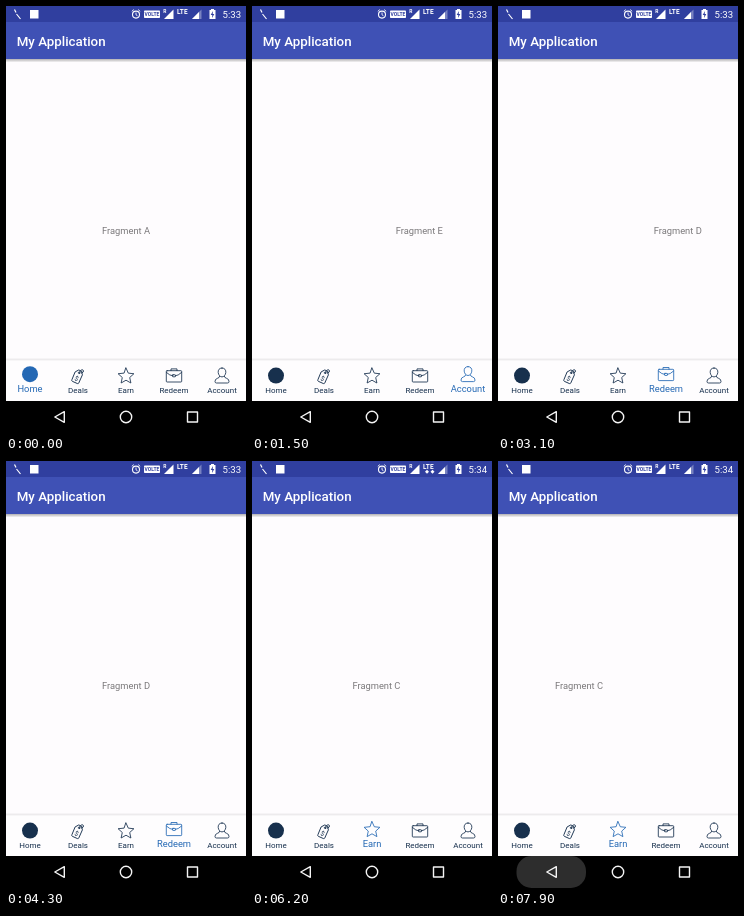
An HTML page for the animation above (8 s loop, 240x427 px).

```html
<!DOCTYPE html>
<html lang="en">
<head>
<meta charset="utf-8">
<title>Bottom navigation</title>
<style>
  html, body { margin: 0; width: 100%; height: 100%; overflow: hidden; background: #fefcfe; }
  svg { display: block; width: 100vw; height: 100vh; }
  text { font-family: Roboto, sans-serif; }
  .page { font-size: 9.33px; fill: #7a787a; text-anchor: middle; }
  .tab { color: #17304d; }
  .tab text { font-size: 8px; fill: currentColor; text-anchor: middle; }
  .tab .icon { fill: none; stroke: currentColor; stroke-width: .85; stroke-linejoin: round; stroke-linecap: round; }
  .tab .dot { fill: currentColor; stroke: none; }
  .tab.on { color: #2468b4; }
  .tab.on .icon { transform: translateY(-1.4px); }
  .tab.on .label { font-size: 9.33px; transform: translateY(-.9px); }
  .tab .icon text { font-size: 6.5px; stroke: none; }
  #press { fill: #2d2d2d; animation: press 8s step-end infinite; }
  @keyframes press {
    0% { opacity: 0; }
    95% { opacity: .35; }
    96.25% { opacity: .7; }
    97.5% { opacity: 1; }
  }
</style>
</head>
<body>
<svg viewBox="0 0 240 427" preserveAspectRatio="none">
  <defs>
    <linearGradient id="shade" x2="0" y2="1">
      <stop offset="0" stop-color="#000" stop-opacity=".3"/>
      <stop offset="1" stop-color="#000" stop-opacity="0"/>
    </linearGradient>
    <linearGradient id="lift" x2="0" y2="1">
      <stop offset="0" stop-color="#000" stop-opacity="0"/>
      <stop offset="1" stop-color="#000" stop-opacity=".1"/>
    </linearGradient>
  </defs>

  <rect width="240" height="427" fill="#fefcfe"/>
  <g id="pages"></g>

  <!-- app bar -->
  <rect y="53" width="240" height="3.5" fill="url(#shade)"/>
  <rect width="240" height="53" fill="#3f51b5"/>
  <rect width="240" height="16" fill="#303f9f"/>
  <text x="10.7" y="39.8" font-size="13.33" font-weight="500" fill="#fff">My Application</text>

  <!-- status bar -->
  <g fill="none" stroke="#fff">
    <path d="M8.5 3.5L10 6.5M10.500 8L14.500 13" stroke-width="1.2"/>
    <circle cx="130" cy="8.600" r="3.500" stroke-width="1.100"/>
    <path d="M130 6.500V8.800L131.500 9.800M125.800 5.300L127.800 3.600M134.200 5.300L132.200 3.600" stroke-width=".9"/>
  </g>
  <g fill="#fff">
    <rect x="24" y="4" width="8.500" height="8.500"/>
    <rect x="138" y="4.500" width="16" height="7.500" rx=".8"/>
    <text x="157.300" y="7.400" font-size="5" font-weight="700">R</text>
    <path d="M167.500 3.500V13H158Z"/>
    <text x="171" y="8" font-size="6.500" font-weight="700">LTE</text>
    <path id="arrows" d="M173 10.800L175 8.800L177 10.800L175 12.800ZM178.500 10.800L180.500 8.800L182.500 10.800L180.500 12.800Z"/>
    <path d="M195.500 3.500V13H186Z" opacity=".35"/>
    <path d="M193 6V13H186Z"/>
    <path d="M205 3H208V4H209.500V13H203.500V4H205Z"/>
    <text id="clock" x="216.600" y="12" font-size="9.600">5:33</text>
  </g>
  <text x="146" y="10.400" font-size="5" font-weight="700" fill="#303f9f" text-anchor="middle">VOLTE</text>
  <path d="M207 5L204.700 9H206.300L206 12L208.300 8H206.700Z" fill="#303f9f"/>

  <!-- tabs -->
  <rect y="351.500" width="240" height="3" fill="url(#lift)"/>
  <rect y="354.500" width="240" height="41" fill="#fefdfe"/>
  <g id="tabs">
    <g class="tab" transform="translate(24 0)">
      <g class="icon"><circle class="dot" cy="369.600" r="8"/></g>
      <text class="label" y="387.300">Home</text>
    </g>
    <g class="tab" transform="translate(72 0)">
      <g class="icon">
        <g transform="translate(-.5 370.500) rotate(24)">
          <path d="M-3.800 -3.500L-1.500 -6.500H1.500L3.800 -3.500V5.500Q3.800 6.500 2.800 6.500H-2.800Q-3.800 6.500 -3.800 5.500Z"/>
          <circle cy="-4" r=".8"/>
          <path d="M0 -4.500Q.5 -9 2.800 -8Q4.500 -6.800 2.300 -4.800"/>
          <text y="4.300">$</text>
        </g>
      </g>
      <text class="label" y="387.300">Deals</text>
    </g>
    <g class="tab" transform="translate(120 0)">
      <g class="icon"><path id="star"/></g>
      <text class="label" y="387.300">Earn</text>
    </g>
    <g class="tab" transform="translate(168 0)">
      <g class="icon">
        <rect x="-7.700" y="364.700" width="15.400" height="11.300" rx=".8"/>
        <path d="M-3 364.500V362.900H3V364.500M-7.500 366.500Q-4 369.800 -1.500 369.800M7.500 366.500Q4 369.800 1.500 369.800"/>
        <rect x="-1.500" y="368.800" width="3" height="2" rx=".5"/>
      </g>
      <text class="label" y="387.300">Redeem</text>
    </g>
    <g class="tab" transform="translate(216 0)">
      <g class="icon">
        <path d="M0 362C-3 362 -4 364.200 -3.800 366.500C-3.500 369 -2 370.900 0 370.900C2 370.900 3.500 369 3.800 366.500C4 364.200 3 362 0 362Z"/>
        <path d="M-2.300 370.300Q-2.500 371.800 -4.500 372.300Q-7 373 -7 375.500Q-7 377 -5.500 377H5.500Q7 377 7 375.500Q7 373 4.500 372.300Q2.500 371.800 2.300 370.300"/>
      </g>
      <text class="label" y="387.300">Account</text>
    </g>
  </g>

  <!-- system keys -->
  <rect y="395" width="240" height="32"/>
  <rect id="press" x="18.500" y="395" width="69.500" height="32" rx="15"/>
  <g fill="none" stroke="#f4f4f4" stroke-width="1.400" stroke-linejoin="round">
    <path d="M48.800 411L58.300 405.700V416.300Z"/>
    <circle cx="120" cy="411" r="5.700"/>
    <rect x="181.500" y="406" width="10" height="10"/>
  </g>
</svg>

<script>
const LOOP = 8000, TICK = 100, SLIDE = 420, WIDTH = 240;
const [A, B, C, D, E] = [0, 1, 2, 3, 4];

// start of each slide, page it goes to, and when it is first painted if late
const moves = [
  { at: 490, to: D },
  { at: 850, to: A },
  { at: 1310, to: E, from: 1500 },
  { at: 1790, to: A },
  { at: 2390, to: C },
  { at: 2998, to: D },
  { at: 3480, to: A },
  { at: 3870, to: D },
  { at: 4390, to: B },
  { at: 5969, to: C },
  { at: 6469, to: D },
  { at: 7772, to: C }
];

const $ = id => document.getElementById(id);
const tabs = [...$("tabs").children];

const pages = [..."ABCDE"].map(letter => {
  const el = document.createElementNS("http://www.w3.org/2000/svg", "text");
  el.setAttribute("class", "page");
  el.setAttribute("y", 227.8);
  el.textContent = "Fragment " + letter;
  return $("pages").appendChild(el);
});

const points = Array.from({ length: 10 }, (_, i) => {
  const r = i % 2 ? 3.9 : 8.3, a = (i / 5 - .5) * Math.PI;
  return (r * Math.cos(a)).toFixed(2) + " " + (370.3 + r * Math.sin(a)).toFixed(2);
});
$("star").setAttribute("d", "M" + points.join("L") + "Z");

const easeOut = p => 1 - (1 - p) ** 5;

function scrollAt(t) {
  let pos = A, page = A;
  for (const { at, to, from = at } of moves) {
    if (t < from) break;
    pos = page + (to - page) * easeOut(Math.min(1, (t - at) / SLIDE));
    page = to;
  }
  return { pos, page };
}

function draw(now) {
  const t = Math.floor(now % LOOP / TICK) * TICK;
  const { pos, page } = scrollAt(t);
  pages.forEach((el, i) => el.setAttribute("x", 120 + (i - pos) * WIDTH));
  tabs.forEach((el, i) => el.classList.toggle("on", i === page));
  $("clock").textContent = t < 4800 ? "5:33" : "5:34";
  $("arrows").style.opacity = t >= 5600 && t < 7600 ? 1 : 0;
  requestAnimationFrame(draw);
}
draw(performance.now());
</script>
</body>
</html>
```
